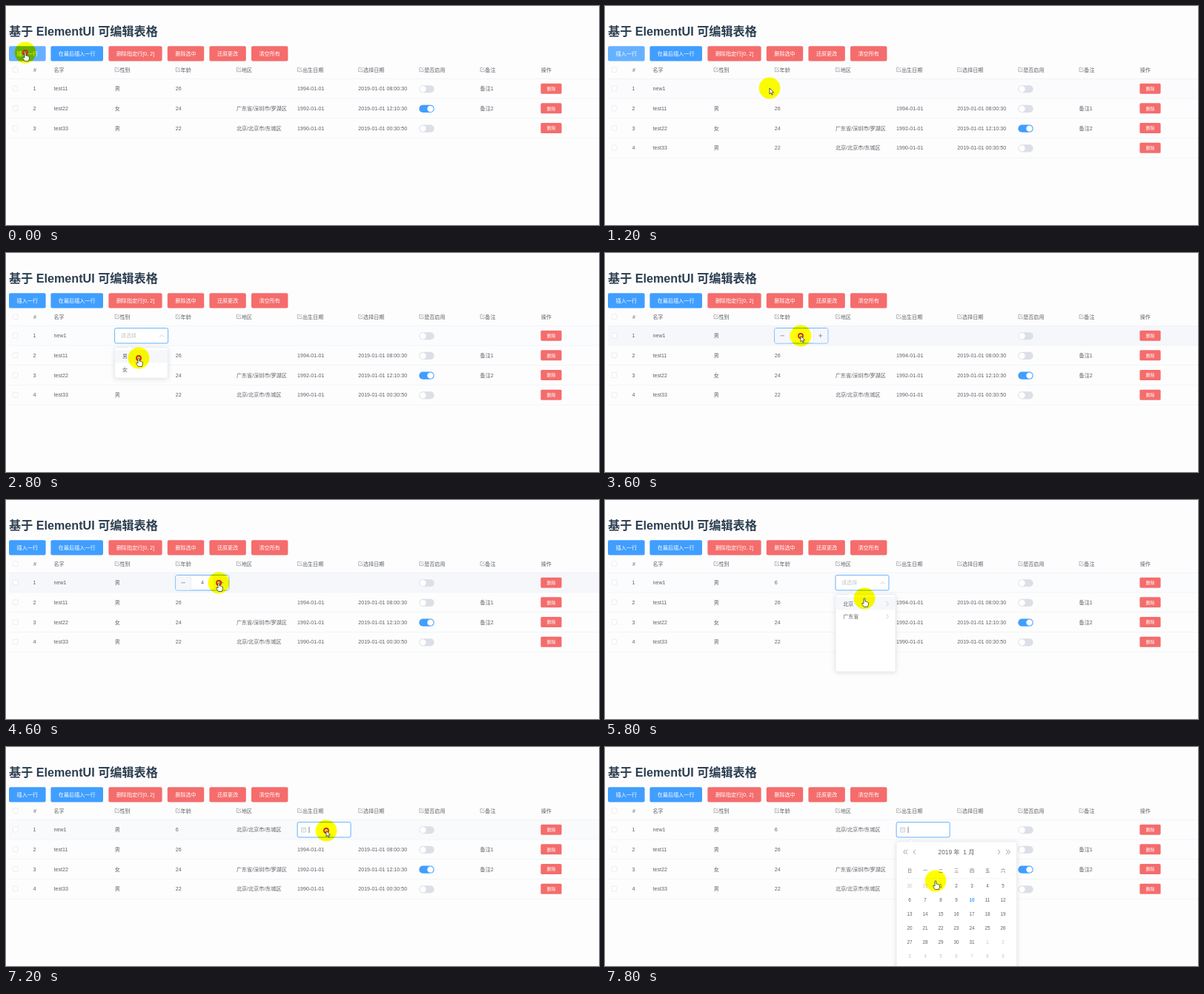
Animation, 800 px wide and 296 px high, one loop 8000 ms. Source, as an HTML page:

```html
<!DOCTYPE html>
<html lang="zh-CN">
<head>
<meta charset="utf-8">
<title>可编辑表格</title>
<style>
html, body { margin: 0; width: 100%; height: 100%; overflow: hidden; background: #fdfdfe; }
svg { display: block; width: 800px; height: 296px; }
text { font: 7.1px "Liberation Sans", "Noto Sans CJK SC", "Noto Sans CJK", sans-serif; fill: #606266; white-space: pre; }
.panel { filter: drop-shadow(0 1px 3px rgba(0, 0, 0, .12)); }
.halo { mix-blend-mode: multiply; }
</style>
</head>
<body>
<svg id="stage" viewBox="0 0 800 296"></svg>
<script>
const LOOP = 8000, STEP = 200;
const BLUE = '#409eff', LIGHT = '#66b1ff', RED = '#f56c6c', LINE = '#ebeef5',
      GREY = '#c0c4cc', HOVER = '#f5f7fa', INK = '#606266';
const ROW = 26.7, TOP = 98.3, MENU_TOP = 128;
const stage = document.getElementById('stage');
const timed = [], growing = [];

function add(parent, tag, attrs = {}) {
  const el = document.createElementNS('http://www.w3.org/2000/svg', tag);
  for (const key in attrs) el.setAttribute(key, attrs[key]);
  return parent.appendChild(el);
}
const rect = (p, x, y, width, height, fill, more) =>
  add(p, 'rect', { x, y, width, height, fill, ...more });
const stroke = (p, d, color = GREY, width = .8) =>
  add(p, 'path', { d, fill: 'none', stroke: color, 'stroke-width': width });
function label(p, str, x, mid, style = {}) {
  const { size = 7.1, fill = INK, anchor = 'start', weight = 400 } = style;
  const el = add(p, 'text', { x, y: mid + size * .36, 'text-anchor': anchor,
    style: `font-size:${size}px;fill:${fill};font-weight:${weight}` });
  el.textContent = str;
  return el;
}
function during(el, from, to = LOOP) {
  timed.push({ el, from, to });
  return el;
}
const group = (from = 0, to = LOOP, parent = stage) => during(add(parent, 'g'), from, to);
const rowMid = i => TOP + ROW * (i + .5);
const colX = i => 64.5 + 82.15 * i;

// Table parts
function button(x, width, str, fill) {
  const box = rect(stage, x, 54.2, width, 20.3, fill, { rx: 2 });
  label(stage, str, x + width / 2, 64.3, { fill: '#fff', anchor: 'middle' });
  return box;
}
function checkbox(p, mid) {
  rect(p, 9.3, mid - 3.4, 6.6, 6.6, '#fff', { rx: 1, stroke: '#dcdfe6', 'stroke-width': .6 });
}
function editIcon(x, y) {
  stroke(stage, `M${x + 3.6} ${y - 2.7}H${x + .5}V${y + 2.7}H${x + 5.7}V${y}`, '#85878c', .6);
  stroke(stage, `M${x + 2.5} ${y + .7}L${x + 6} ${y - 2.8}`, '#85878c', .7);
}
function rowCells(p, mid, cells, on) {
  checkbox(p, mid);
  cells.forEach((str, i) => label(p, str, colX(i), mid));
  rect(p, 557.3, mid - 4.5, 20.4, 10.2, on ? BLUE : '#dcdfe6', { rx: 5.1 });
  add(p, 'circle', { cx: on ? 572.5 : 562.5, cy: mid + .6, r: 4.2, fill: '#fff' });
  rect(p, 721.4, mid - 7, 28.2, 14, RED, { rx: 1.6 });
  label(p, '删除', 735.5, mid, { size: 6.1, fill: '#fff', anchor: 'middle' });
  rect(p, 4, mid + ROW / 2 - .3, 796, .6, LINE);
}

rect(stage, 0, 0, 800, 296, '#fdfdfe');
label(stage, '基于 ElementUI 可编辑表格', 4, 34, { size: 16.15, fill: '#2c3e50', weight: 700 });
const insertButton = button(4, 49.6, '插入一行', LIGHT);
button(60.4, 70.6, '在最后插入一行', BLUE);
button(138.4, 72.2, '删除指定行[0, 2]', RED);
button(217.8, 49.4, '删除选中', RED);
button(274.4, 49.4, '还原更改', RED);
button(331, 49.4, '清空所有', RED);

const hoverRow = rect(stage, 4, TOP, 796, ROW, HOVER);
checkbox(stage, 86.2);
label(stage, '#', 37, 86);
['名字', '性别', '年龄', '地区', '出生日期', '选择日期', '是否启用', '备注', '操作'].forEach((str, i) => {
  const icon = i > 0 && i < 8;
  if (icon) editIcon(colX(i), 86);
  label(stage, str, colX(i) + (icon ? 6.8 : 0), 86);
});
rect(stage, 4, TOP - .3, 796, .6, LINE);

const people = add(stage, 'g');
[
  ['test11', '男', '26', '', '1994-01-01', '2019-01-01 08:00:30', '', '备注1'],
  ['test22', '女', '24', '广东省/深圳市/罗湖区', '1992-01-01', '2019-01-01 12:10:30', '', '备注2'],
  ['test33', '男', '22', '北京/北京市/东城区', '1990-01-01', '2019-01-01 00:30:50', '', '']
].forEach((cells, i) => rowCells(people, rowMid(i), cells, i === 1));
for (let i = 0; i < 4; i++)
  label(group(i === 3 ? STEP : 0), i + 1, 36.5, rowMid(i));

const mid = rowMid(0);
rowCells(group(200), mid, ['new1'], false);
label(group(3200), '男', colX(1), mid);
label(group(5400), '6', colX(2), mid);
label(group(7000), '北京/北京市/东城区', colX(3), mid);

// Cell editors and their popups
function field(p, col) {
  const x = colX(col);
  rect(p, x, 101.6, 72, 20.4, '#fff', { rx: 2, stroke: BLUE, 'stroke-width': .8 });
  return x;
}
function chevron(p, x, y, dx, dy, color) {
  stroke(p, dx ? `M${x - dx} ${y - 3}L${x + dx} ${y}L${x - dx} ${y + 3}`
               : `M${x - 3} ${y - dy}L${x} ${y + dy}L${x + 3} ${y - dy}`, color);
}
function picker(col, from, to) {
  const g = group(from, to), x = field(g, col);
  chevron(g, x + 63.5, 112, 0, -1.5);
  return g;
}
function popup(col, width, height, from, to, scale) {
  const g = group(from, to), x = colX(col);
  g.setAttribute('class', 'panel');
  rect(g, x, MENU_TOP, width, height, '#fff', { rx: 2, stroke: '#e4e7ed', 'stroke-width': .6 });
  add(g, 'path', { d: `M${x + 17} 128.2l3-3 3 3`, fill: '#fff', stroke: '#e4e7ed', 'stroke-width': .5 });
  growing.push({ g, from, scale });
  return g;
}

const sexField = picker(1, 1800, 3200);
label(group(1800, 3000, sexField), '请选择', 154.8, mid, { fill: GREY });
label(group(3000, 3200, sexField), '男', 154.8, mid);
const sexMenu = popup(1, 71.6, 41, 2000, 3000, .25);
rect(group(2400, 3000, sexMenu), 147, 131, 71, 17.4, HOVER);
label(sexMenu, '男', 157, 139.8);
label(sexMenu, '女', 157, 157.2);

const ageField = group(3600, 5400);
field(ageField, 2);
rect(ageField, 229.3, 102, 20, 19.6, HOVER);
rect(ageField, 280.8, 102, 19.6, 19.6, HOVER);
stroke(ageField, 'M249.3 102V121.6M280.8 102V121.6', '#dcdfe6', .6);
stroke(ageField, 'M236.5 111.8h5.4M288 111.8h5.4M290.7 109.1v5.4', INK, .6);
const ageText = label(ageField, '', 265, mid, { anchor: 'middle' });

label(picker(3, 5400, 7000), '请选择', 319, mid, { fill: GREY });
function areaMenu(col, names, from, openAt, hoverAt, scale) {
  const x = colX(3) + 80.8 * col, g = popup(3, 80.8 * (col + 1), 104, from, 7000, scale);
  g.dataset.col = col;
  return { g, x, names, openAt, hoverAt };
}
const areas = popup(3, 81, 104, 5600, 7000, .64);
const wide = [popup(3, 161.6, 104, 6000, 6400, 1), popup(3, 242.4, 104, 6400, 7000, 1)];
function areaColumn(col, names, from, hover, activeAt) {
  const g = group(from, 7000), x = colX(3) + 80.8 * col;
  rect(group(...hover, g), x + .4, 131, 80, 17.4, HOVER);
  if (col) rect(g, x - .3, 128, .6, 104, '#e4e7ed');
  names.forEach((str, i) => {
    const y = 140.4 + 17.3 * i;
    const el = label(g, str, x + 10.2, y);
    if (activeAt && !i) {
      during(el, 0, activeAt);
      during(label(g, str, x + 10.2, y, { fill: BLUE }), activeAt);
    }
    if (col < 2) chevron(g, x + 70, y - .3, 1.4, 0);
  });
  return g;
}
growing.push({ g: areaColumn(0, ['北京', '广东省'], 5600, [5800, 6200], 6000), from: 5600, scale: .64 });
areaColumn(1, ['北京市'], 6000, [6200, 7000], 6400);
areaColumn(2, ['东城区'], 6400, [6600, 7000]);

const dateField = group(7200);
const dateX = field(dateField, 4);
rect(dateField, dateX + 5.4, 109.4, 6, 5.6, 'none', { stroke: GREY, 'stroke-width': .7 });
stroke(dateField, `M${dateX + 5.4} 111.2h6M${dateX + 7} 108.3v1.6M${dateX + 9.8} 108.3v1.6M${dateX + 6.6} 113.1h3.6`, GREY, .6);
rect(dateField, 408.6, 107.8, .8, 8.4, INK);

const calendar = popup(4, 162.4, 190, 7400, LOOP, .5);
label(calendar, '2019 年  1 月', 474, 142, { size: 8.3, anchor: 'middle' });
[404, 406.8, 417.5].forEach(x => chevron(calendar, x, 141.8, -1.2, 0, '#85878c'));
[531.5, 542.4, 545.2].forEach(x => chevron(calendar, x, 141.8, 1.2, 0, '#85878c'));
const dayX = i => 411 + 21 * i;
[...'日一二三四五六'].forEach((d, i) => label(calendar, d, dayX(i), 167.2, { size: 6.2, anchor: 'middle' }));
rect(calendar, 403, 177.6, 142, .6, LINE);
for (let i = 0; i < 42; i++) {
  const day = new Date(2019, 0, i - 1), today = i === 11;
  label(calendar, day.getDate(), dayX(i % 7), 187.6 + 19.1 * Math.floor(i / 7), {
    size: 6.3, anchor: 'middle', weight: today ? 700 : 400,
    fill: today ? BLUE : day.getMonth() ? GREY : INK
  });
}

// Pointer: time, x, y
const path = [
  [0, 26, 63], [800, 26, 63], [1200, 222, 111], [1600, 182, 112], [2000, 180, 113],
  [2600, 179, 140], [2800, 179, 142], [3000, 190, 143], [3200, 245, 150], [3400, 258, 118],
  [3600, 264, 112], [3800, 287, 112], [5000, 287, 112], [5400, 346, 112], [5600, 348, 117],
  [5800, 350, 133], [6000, 351, 140], [6200, 425, 141], [6600, 492, 141], [6800, 492, 141],
  [7000, 468, 128], [7200, 432, 113], [7400, 434, 118], [7800, 446, 181]
];
const clicks = [0, 1800, 2800, 3600, 4000, 4200, 4400, 4600, 4800, 5000, 5400, 6000, 6200, 6800, 7200];
const arrowTimes = [[1000, 1800], [3200, 3800], [5200, 5400], [7000, 7400]];
// Row highlight: start time, strength
const shades = [[0, 0], [1200, .35], [1400, 1], [2400, .3], [3400, 1], [5800, .3], [6000, 0], [7000, .5], [7400, 0]];

const halo = add(stage, 'circle', { r: 14.4, fill: '#ffff00', class: 'halo' });
const pointer = add(stage, 'g');
const ring = add(pointer, 'circle', { r: 3, fill: 'none', stroke: '#d0281e', 'stroke-width': 1.8 });
const shape = { fill: '#fff', stroke: '#222', 'stroke-width': .7, 'stroke-linejoin': 'round' };
const hand = add(pointer, 'path', { ...shape,
  d: 'M-1 7V.8Q-1-.2 0-.2T1 .8V4.2Q2 3.6 2.6 4.6Q3.6 4.2 4.2 5.2Q5.4 4.8 5.4 6.2V8.5L4.4 11.5H-.6L-3.4 7.6Q-3.6 6-2 6.4Z' });
const arrow = add(pointer, 'path', { ...shape, d: 'M0 0V8L1.8 6.3 3 9.2 4.3 8.6 3.1 5.9H5.6Z' });

const show = (el, on) => { el.style.display = on ? '' : 'none'; };
function place(t) {
  const i = path.findIndex(p => p[0] >= t);
  if (i < 1) return path[i < 0 ? path.length - 1 : 0].slice(1);
  const [a, b] = [path[i - 1], path[i]], k = (t - a[0]) / (b[0] - a[0]);
  return [a[1] + (b[1] - a[1]) * k, a[2] + (b[2] - a[2]) * k];
}

function draw(t) {
  timed.forEach(({ el, from, to }) => show(el, t >= from && t < to));
  growing.forEach(({ g, from, scale }) => {
    const s = t === from ? scale : 1;
    g.setAttribute('transform', `translate(0 ${MENU_TOP * (1 - s)}) scale(1 ${s})`);
  });
  people.setAttribute('transform', `translate(0 ${t >= 200 ? ROW : 0})`);
  insertButton.setAttribute('fill', t < 2000 ? LIGHT : BLUE);
  hoverRow.setAttribute('opacity', shades.filter(s => s[0] <= t).pop()[1]);
  ageText.textContent = t < 4000 ? '' : Math.min(6, 1 + (t - 4000) / STEP);
  const move = `translate(${place(t).join(' ')})`;
  halo.setAttribute('transform', move);
  pointer.setAttribute('transform', move);
  const isArrow = arrowTimes.some(([from, to]) => t >= from && t < to);
  show(arrow, isArrow);
  show(hand, !isArrow);
  show(ring, clicks.includes(t));
}

const start = performance.now();
function tick() {
  const t = (performance.now() - start) % LOOP;
  draw(Math.floor(t / STEP) * STEP);
  requestAnimationFrame(tick);
}
tick();
</script>
</body>
</html>
```
